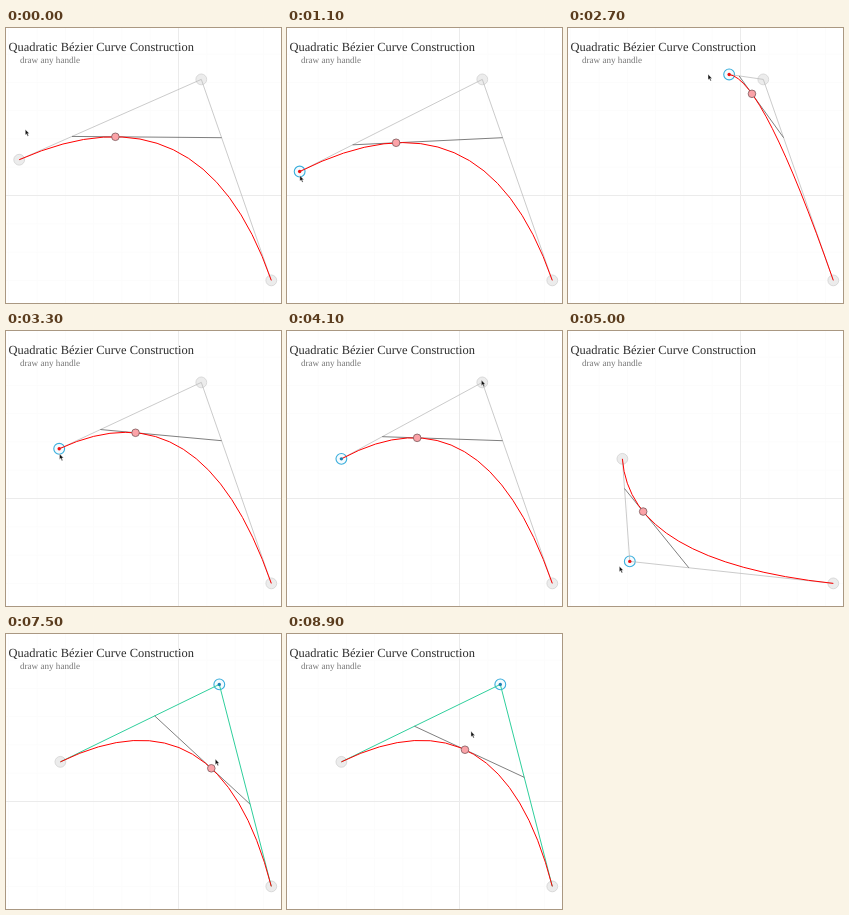
Animation of 275 by 275 pixels, one loop 9.3 s. Source, as an HTML page:

```html
<!DOCTYPE html>
<html lang="en">
<head>
<meta charset="utf-8">
<title>Quadratic Bézier Curve Construction</title>
<style>
  html, body { margin: 0; width: 100%; height: 100%; overflow: hidden; background: #fff; }
  svg { display: block; width: 100vw; height: 100vh; }
  text { font-family: "Liberation Serif", "Times New Roman", serif; text-rendering: geometricPrecision; }
  .minor { stroke: #fcfcfc; }
  .axis { stroke: #ebebeb; }
  .handle { fill: #ececec; stroke: #d2d2d2; stroke-width: .8; }
  .handle.active { fill: #f5fbfe; stroke: #3aaedc; stroke-width: 1.1; }
  .leg { stroke: #bababa; stroke-width: .75; }
  .leg.lit { stroke: #2fcf9c; stroke-width: 1; }
  .chord { stroke: #555; stroke-width: .75; }
  .curve { fill: none; stroke: #f00; }
  .mover { fill: #fba3a8; stroke: #7c5a5c; stroke-width: .8; }
  .cursor { fill: #111; stroke: #fff; stroke-width: .4; }
</style>
</head>
<body>
<svg viewBox="0 0 275 275">
  <g id="grid"></g>
  <text x="2.5" y="23" font-size="12.45" fill="#2c2c2c">Quadratic Bézier Curve Construction</text>
  <text x="14" y="35" font-size="9.1" fill="#777">draw any handle</text>
  <g id="figure" transform="translate(.3 .4)"></g>
</svg>
<script>
const LOOP = 9300, STEP = 100, LEAD = 60;
const grid = document.getElementById('grid');
const figure = document.getElementById('figure');

function set(el, attrs) {
  for (const k in attrs) el.setAttribute(k, attrs[k]);
}
function add(tag, attrs, parent = figure) {
  const el = document.createElementNS('http://www.w3.org/2000/svg', tag);
  set(el, attrs);
  parent.append(el);
  return el;
}
const line = (el, a, b) => set(el, { x1: a[0], y1: a[1], x2: b[0], y2: b[1] });
const place = (el, p) => set(el, { cx: p[0], cy: p[1] });
const mix = (a, b, u) => a.map((v, i) => v + (b[i] - v) * u);

// Smooth path through rows of [time, ...values], at rest on both ends.
function track(rows, time) {
  const last = rows.length - 1;
  const t = Math.min(rows[last][0], Math.max(rows[0][0], time));
  const i = Math.max(0, rows.findIndex(r => r[0] >= t) - 1);
  const a = rows[i], b = rows[i + 1], span = b[0] - a[0];
  const u = (t - a[0]) / span, w = 1 - u;
  const slope = (k, n) => k === 0 || k === last ? 0
    : (rows[k + 1][n] - rows[k - 1][n]) / (rows[k + 1][0] - rows[k - 1][0]);
  return a.slice(1).map((v, k) => {
    const n = k + 1;
    return w * w * (1 + 2 * u) * v + u * u * (3 - 2 * u) * b[n]
      + span * u * w * (w * slope(i, n) - u * slope(i + 1, n));
  });
}

// The first handle sweeps round an ellipse: angle in degrees, relative radius.
const sweep = [[600, 186, .983], [1700, 134.3, .974], [2700, -79.6, .938], [3500, -168, .673]];
const swing = [[4300, 195, 51], [5000, 61.5, 230], [5150, 50, 222], [5800, 213, 50]];
const slide = [[6500, .29], [7000, .14], [7900, .89], [8500, .46]];
const END = [265, 252];

function startAt(time) {
  const [angle, r] = track(sweep, time);
  const a = angle * Math.PI / 180;
  return [139 + 129 * r * Math.cos(a), 142 + 104 * r * Math.sin(a)];
}
const midAt = time => track(swing, time);

// Ease-out glide of the pointer between drags.
function glide(a, b, from, to, time) {
  const u = Math.min(1, Math.max(0, (time - from) / (to - from)));
  return mix(a, b, 1 - (1 - u) ** 2);
}

function pointer(time, mover) {
  if (time < 600) return glide([19, 101], startAt(0), 200, 600, time);
  if (time < 3500) return startAt(time + LEAD);
  if (time < 4300) return glide(startAt(time), [197, 47], 3500, 4200, time);
  if (time < 5800) return midAt(time + LEAD);
  if (time < 6500) return glide(midAt(time), [139, 109], 5800, 6500, time);
  const u = Math.min(1, (time - 6500) / 2000);
  return [mover[0] + 2 + 4 * u, mover[1] - 18.5 * u];
}

for (const cls of ['minor', 'axis']) {
  for (let k = -6; k <= 6; k++) {
    if ((k === 0) !== (cls === 'axis')) continue;
    const x = 172.5 + k * 28.3, y = 167.5 + k * 28.3;
    line(add('line', { class: cls }, grid), [x, 0], [x, 275]);
    line(add('line', { class: cls }, grid), [0, y], [275, y]);
  }
}

const handles = [0, 1, 2].map(() => add('circle', { class: 'handle', r: 5.4 }));
const legs = [0, 1].map(() => add('line', {}));
const chord = add('line', { class: 'chord' });
const curve = add('path', { class: 'curve' });
const dot = add('circle', { r: 1.7 });
const mover = add('circle', { class: 'mover', r: 3.8 });
const cursor = add('path', { class: 'cursor', d: 'M0 0V5.6L1.3 4.5L2.3 6.8L3.3 6.3L2.3 4.2H4Z' });

function draw(time) {
  const pts = [startAt(time), midAt(time), END];
  const [ratio] = track(slide, time);
  const q = [mix(pts[0], pts[1], ratio), mix(pts[1], pts[2], ratio)];
  const m = mix(q[0], q[1], ratio);
  const active = time < 600 ? -1 : time < 4300 ? 0 : 1;
  const dragging = time < 3500 || (time >= 4300 && time < 5800);

  handles.forEach((h, i) => {
    place(h, pts[i]);
    set(h, { class: i === active ? 'handle active' : 'handle' });
  });
  legs.forEach((leg, i) => {
    line(leg, pts[i], pts[i + 1]);
    set(leg, { class: time >= 6500 ? 'leg lit' : 'leg' });
  });
  line(chord, q[0], q[1]);
  set(curve, { d: `M${pts[0]}Q${pts[1]} ${pts[2]}` });
  place(dot, pts[Math.max(0, active)]);
  set(dot, { fill: active < 0 ? 'none' : dragging ? '#e11' : '#1b7fb5' });
  place(mover, m);
  set(cursor, { transform: `translate(${pointer(time, m)})` });
}

const begin = performance.now();
function tick() {
  const now = (performance.now() - begin) % LOOP;
  draw(Math.floor(now / STEP) * STEP);
  requestAnimationFrame(tick);
}
tick();
</script>
</body>
</html>
```
